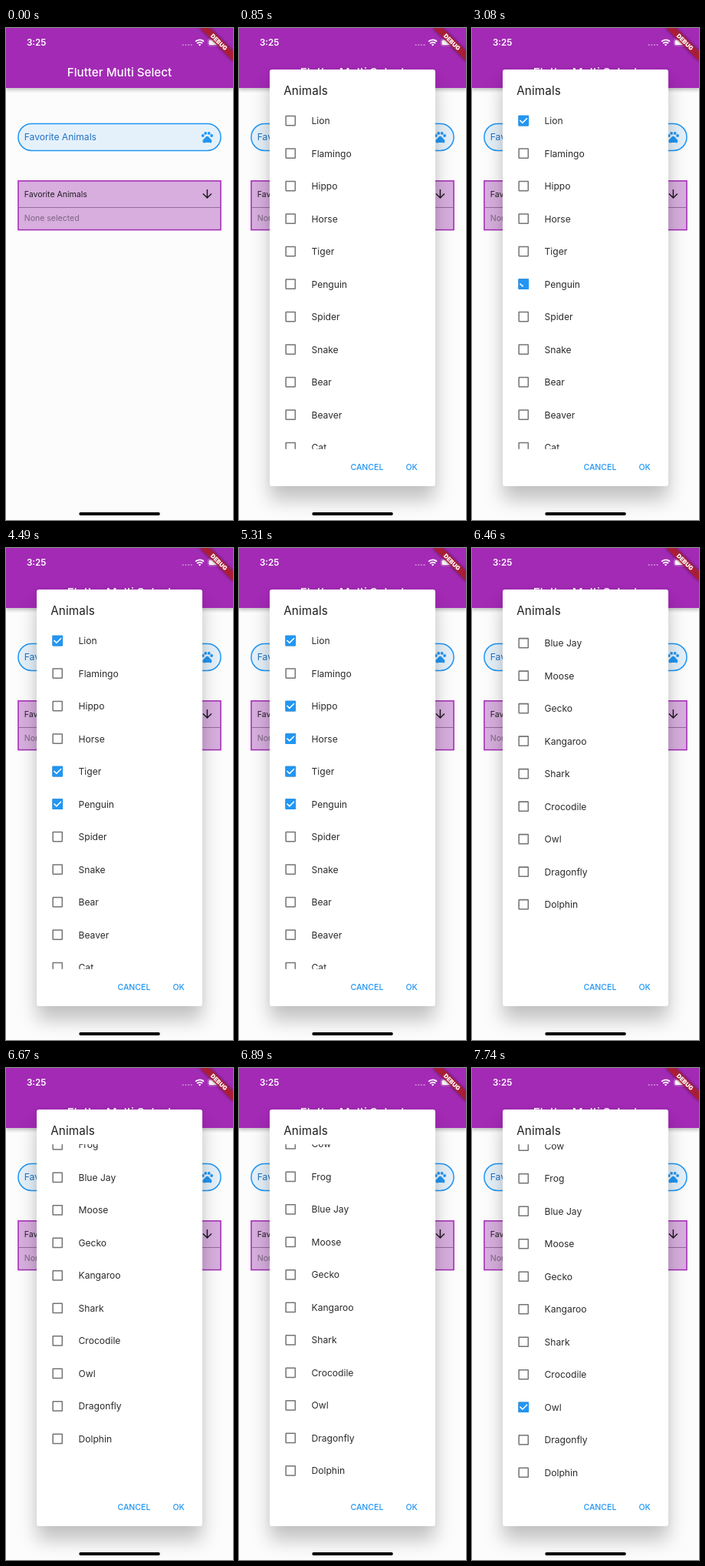
Write an HTML page that moves like this. It is 296 px wide and 640 px high and loops after 8 s.

```html
<!DOCTYPE html>
<html lang="en">
<head>
<meta charset="utf-8">
<title>Multi select</title>
<style>
  html, body { margin: 0; width: 100%; height: 100%; overflow: hidden; background: #fcfcfc; }
  svg { position: absolute; left: 0; top: 0; display: block; }
  text { font-family: Inter, Roboto, sans-serif; font-size: 12.1px; }
  .small { font-size: 10.55px; }
  .bar, #dialog, .card { position: absolute; }
  .bar { left: 0; top: 0; width: 296px; height: 78.2px; background: #a32ab5; box-shadow: 0 3px 4px rgba(0,0,0,.22); }
  #dialog { left: 0; top: 0; width: 296px; height: 640px; opacity: 0; }
  .card {
    left: 40px; top: 54px; width: 216px; height: 542px; border-radius: 3px; background: #fff;
    box-shadow: 0 18px 25px rgba(0,0,0,.23), 0 0 10px rgba(0,0,0,.04);
  }
  .name { fill: #2b2b2b; }
  .box { fill: none; stroke: #757575; stroke-width: 1.52; }
  .fill { fill: #2196f3; }
  .tick { fill: none; stroke: #fff; stroke-width: 1.52; stroke-dasharray: 1 2; }
  .action { fill: #2196f3; font-size: 10.55px; font-weight: 500; }
</style>
</head>
<body>
<div class="bar"></div>
<svg width="296" height="640" viewBox="0 0 296 640">
  <text x="148" y="62.5" fill="#fff" text-anchor="middle" style="font-size:15.2px;font-weight:500">Flutter Multi Select</text>

  <!-- status bar -->
  <text x="26.9" y="23.1" fill="#fff" style="font-size:11.6px;font-weight:600">3:25</text>
  <g fill="#fff" fill-opacity=".45">
    <circle cx="230.7" cy="22" r="1.1"/><circle cx="234.4" cy="22" r="1.1"/>
    <circle cx="238" cy="22" r="1.1"/><circle cx="241.6" cy="22" r="1.1"/>
  </g>
  <g fill="none" stroke="#fff" stroke-width="1.8">
    <path d="M247.2 17.6a7.6 7.6 0 0 1 10.8 0"/>
    <path d="M249.2 20a4.8 4.8 0 0 1 6.8 0"/>
  </g>
  <path d="M250.9 21.6a2.5 2.5 0 0 1 3.4 0L252.6 23.4z" fill="#fff"/>
  <rect x="263.5" y="14.3" width="17.2" height="8.8" rx="2.4" fill="none" stroke="#fff" stroke-opacity=".5" stroke-width=".7"/>
  <rect x="264.6" y="15.4" width="15" height="6.6" rx="1.5" fill="#fff"/>

  <!-- debug ribbon -->
  <g transform="translate(296 0) rotate(45)">
    <rect x="-30.4" y="21.25" width="60.8" height="9.1" fill="#ab1d36" style="filter:drop-shadow(0 0 2px rgba(0,0,0,.5))"/>
    <text x="0" y="28.6" fill="#fff" text-anchor="middle" style="font-size:7.7px;font-weight:900">DEBUG</text>
  </g>

  <!-- pill field -->
  <rect x="15.94" y="124.5" width="264.1" height="35" rx="17.5" fill="#e5f1fa" stroke="#2196f3" stroke-width="1.52"/>
  <text x="23.7" y="146.4" fill="#1f72c4">Favorite Animals</text>
  <g fill="#2196f3" transform="translate(253.3 132.8) scale(.759)">
    <circle cx="4.5" cy="9.5" r="2.5"/><circle cx="9" cy="5.5" r="2.5"/>
    <circle cx="15" cy="5.5" r="2.5"/><circle cx="19.5" cy="9.5" r="2.5"/>
    <path d="M17.3 14.9L14.9 12Q13.6 10.5 12 10.5T9.1 12L6.7 14.9C5.4 16.2 3.8 17.6 4.1 19.6Q4.7 21.7 6.4 22C7.1 22.1 9.5 21.5 12 21.5S16.9 22.1 17.6 22Q19.3 21.7 19.9 19.6C20.2 17.6 18.6 16.2 17.3 14.9z"/>
  </g>

  <!-- boxed field -->
  <rect x="15.94" y="198.9" width="264.1" height="63.7" fill="#d7aede" stroke="#a32ab5" stroke-width="1.52"/>
  <path d="M16.7 233.5h262.6" stroke="#8d6296" stroke-width=".9"/>
  <text class="small" x="23.7" y="219.9" fill="#251e27">Favorite Animals</text>
  <text class="small" x="23.7" y="251.4" fill="#7c6581">None selected</text>
  <path transform="translate(253.3 206.9) scale(.759)" fill="#1f1a21" d="M20 12l-1.4-1.4L13 16.2V4h-2v12.2l-5.6-5.6L4 12l8 8z"/>

  <rect x="95.3" y="630.1" width="105.5" height="3.8" rx="1.9"/>
</svg>

<div id="dialog">
  <div class="card"></div>
  <svg width="296" height="640" viewBox="0 0 296 640">
    <clipPath id="view"><rect x="40" y="99.3" width="216" height="448.5"/></clipPath>
    <text x="58.2" y="86.7" fill="#1f1f1f" style="font-size:15.2px;letter-spacing:.15px">Animals</text>
    <g clip-path="url(#view)"><g id="list"></g></g>
    <text class="action" x="145.4" y="575.4">CANCEL</text>
    <text class="action" x="217.4" y="575.4">OK</text>
  </svg>
</div>

<script>
const LOOP = 8000, ROW = 42.5, END = 698.9;
const names = ("Lion,Flamingo,Hippo,Horse,Tiger,Penguin,Spider,Snake,Bear,Beaver,Cat,Fish,Rabbit,Mouse,Dog,Zebra," +
  "Cow,Frog,Blue Jay,Moose,Gecko,Kangaroo,Shark,Crocodile,Owl,Dragonfly,Dolphin").split(",");

// name: [tick half drawn, tick complete]
const taps = {
  Lion: [2030, 2130], Penguin: [3080, 3190], Tiger: [3660, 3770],
  Horse: [4610, 4730], Hippo: [5200, 5310], Owl: [7630, 7740]
};

// overdamped spring back from the overscroll
function bounce(time) {
  const t = Math.max(0, time - 6490) / 1000;
  return END + 63 * (22 * Math.exp(-9.07 * t) - 9.07 * Math.exp(-22 * t)) / 12.93;
}

const scrolls = [[0, 0], [6140, 39.2], [6250, 235], [6360, 543]]
  .concat([6460, 6570, 6680, 6790, 6890, 7000, 7100].map(t => [t, bounce(t)]));
const fades = [[0, 0], [740, .6], [850, 1]];

const held = (steps, t) => steps.filter(s => s[0] <= t).pop()[1];

const dialog = document.getElementById("dialog");
const list = document.getElementById("list");

list.innerHTML = names.map((name, i) => {
  const mark = taps[name] ? `<g class="mark" data-name="${name}">
    <rect class="fill" x="60.4" y="-6.83" width="13.66" height="13.66" rx=".8"/>
    <path class="tick" pathLength="1" d="M62.45 -.68L65.86 2.73L72 -3.4"/></g>` : "";
  return `<g transform="translate(0 ${120.6 + ROW * i})">
    <rect class="box" x="61.16" y="-6.07" width="12.14" height="12.14" rx=".3"/>${mark}
    <text class="name" x="94.5" y="4.5">${name}</text></g>`;
}).join("");

const marks = [...list.querySelectorAll(".mark")];

function draw(t) {
  dialog.style.opacity = held(fades, t);
  list.setAttribute("transform", `translate(0 ${-held(scrolls, t)})`);
  for (const mark of marks) {
    const [half, full] = taps[mark.dataset.name];
    mark.style.visibility = t < half ? "hidden" : "visible";
    mark.lastElementChild.style.strokeDashoffset = t < full ? .55 : 0;
  }
}

const start = performance.now();
function tick() {
  draw((performance.now() - start) % LOOP);
  requestAnimationFrame(tick);
}
tick();
</script>
</body>
</html>
```
